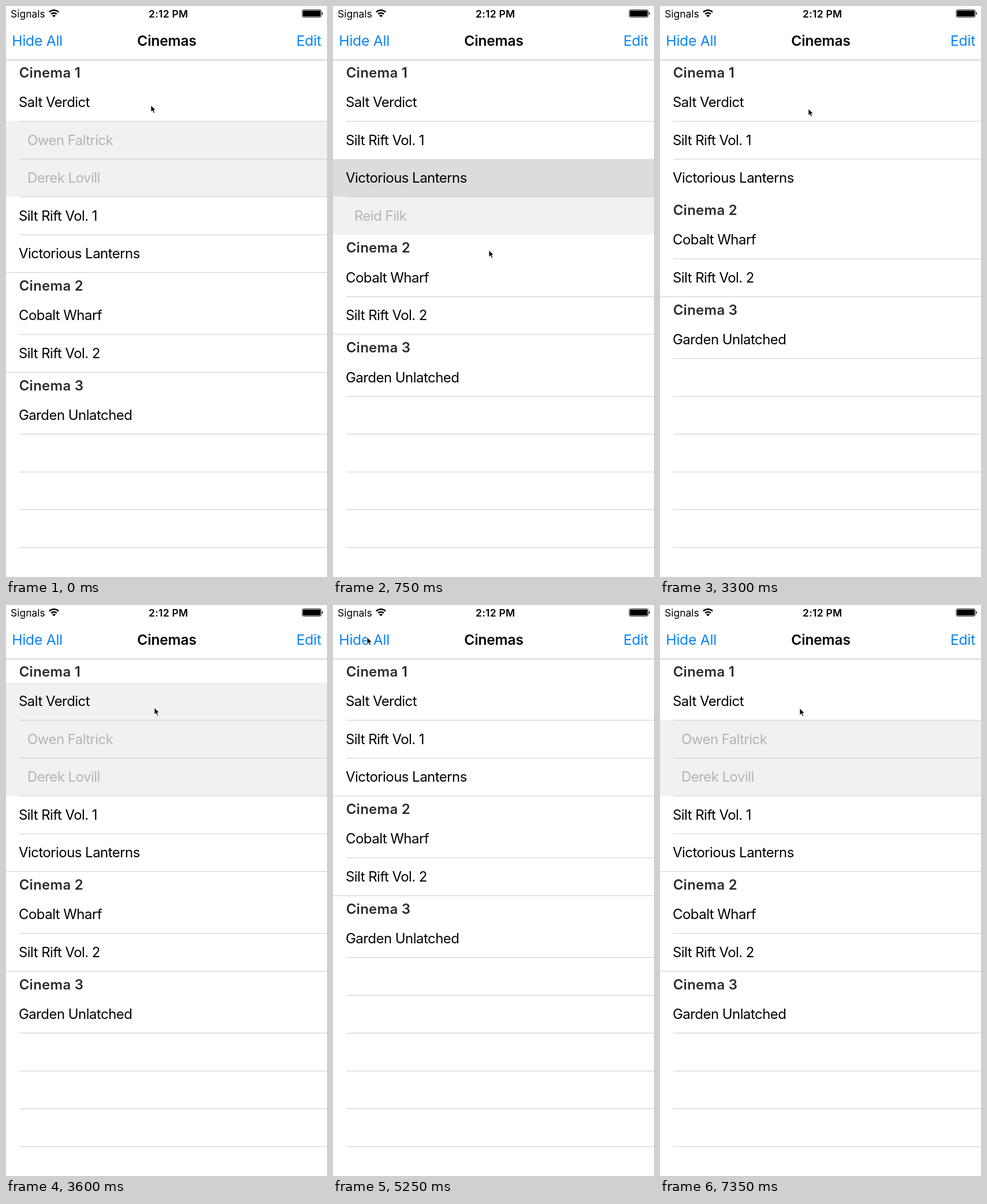
Recreate the animation shown at these times as an HTML page. Size 556 px wide and 989 px high, loop 7.5 s.

```html
<!DOCTYPE html>
<html lang="en">
<head>
<meta charset="utf-8">
<title>Cinemas</title>
<style>
  html, body { margin: 0; width: 100%; height: 100%; overflow: hidden; background: #fff; }
  svg { display: block; width: 100%; height: 100%; }
  text { font-family: Inter, Roboto, sans-serif; font-optical-sizing: none; white-space: pre; }
  .fill { shape-rendering: crispEdges; }
  .row, .actor { font-size: 24px; letter-spacing: -0.55px; }
  .actor { fill: #b4b4b4; }
  .head { font-size: 24px; font-weight: 600; letter-spacing: 0.25px; fill: #2b2b2b; }
  .title { font-size: 24.5px; font-weight: 600; letter-spacing: -0.15px; text-anchor: middle; }
  .link { font-size: 24.7px; letter-spacing: -0.25px; fill: #0a84f5; }
  .status { font-size: 17.5px; }
  .clock { font-size: 17.5px; font-weight: 600; letter-spacing: 0.25px; text-anchor: middle; }
</style>
</head>
<body>
<svg viewBox="0 0 556 989" xmlns="http://www.w3.org/2000/svg">
  <g id="list"></g>
  <g id="bar">
    <rect class="fill" width="556" height="93" fill="#fff"/>
    <rect class="fill" y="93" width="556" height="1" fill="#b4b4b6"/>
    <text class="status" x="8" y="19.5">Signals</text>
    <g fill="none" stroke="#000" stroke-width="2.5">
      <path d="M75 10.6A11.5 11.5 0 0 1 91 10.6"/>
      <path d="M78.2 14A7 7 0 0 1 87.8 14"/>
    </g>
    <path d="M83 19.4L80 16.4A4.2 4.2 0 0 1 86 16.4Z"/>
    <text class="clock" x="281.2" y="19.5">2:12 PM</text>
    <rect x="513" y="6.5" width="33" height="13" rx="2.5" fill="none" stroke="#000" stroke-width="0.8"/>
    <rect x="514.2" y="7.7" width="30.6" height="10.6" rx="1.2"/>
    <path d="M547.2 10.8q1.8 0.6 1.8 2.2t-1.8 2.2Z"/>
    <text class="link" id="hide" x="10.3" y="69.3">Hide All</text>
    <text class="title" x="278.5" y="69.3">Cinemas</text>
    <text class="link" x="546" y="69.3" text-anchor="end">Edit</text>
  </g>
  <path id="cursor" d="M0 0V11.5L2.7 9.2L4.7 13.6L6.7 12.7L4.8 8.4L8.2 8.1Z" stroke="#fff" stroke-width="0.8"/>
</svg>
<script>
const LOOP = 7500, STEP = 150, SLIDE = 300;
const ROW = 65.5, HEAD = 41.7, TOP = 92.1, GRID_END = 937.7;
const $ = id => document.getElementById(id);

// Moments at which the layout starts to change
const SWAP = 450, CLOSE = 1752, OPEN = 3300, HIDE = 4650, REOPEN = 6450;

// Pointer moves: start, end, x, y
const moves = [
  [150, 450, 270, 423],
  [900, 1350, 269, 294],
  [2550, 3150, 257, 178],
  [3600, 4300, 59, 56],
  [5850, 6300, 242, 179]
];

const clamp = u => Math.min(1, Math.max(0, u));
function ease(t, start, end = start + SLIDE) {
  const u = clamp((t - start) / (end - start));
  return u * u * (3 - 2 * u);
}

// Full strength from the tap, then a quick fade
const flash = (t, tap, hold) => t < tap ? 0 : clamp(1 - (t - tap - hold) / 250);

function pointerAt(t) {
  let x = 251, y = 172;
  for (const [start, end, tx, ty] of moves) {
    const u = ease(t, start, end);
    x += (tx - x) * u;
    y += (ty - y) * u;
  }
  return `translate(${x.toFixed(1)} ${y.toFixed(1)})`;
}

const box = (y, h, fill) =>
  `<rect class="fill" y="${y}" width="556" height="${h}" fill="${fill}"/>`;
const label = (cls, x, y, s) => `<text class="${cls}" x="${x}" y="${y}">${s}</text>`;
const line = (y, x = 23) =>
  `<rect x="${x}" y="${y}" width="${556 - x}" height="0.8" fill="#bebec0"/>`;

function shade(glow) {
  const v = Math.round(255 - 35 * glow);
  return `rgb(${v},${v},${v})`;
}

function listMarkup(t) {
  const first = 1 - ease(t, SWAP) + ease(t, OPEN) - ease(t, HIDE) + ease(t, REOPEN);
  const third = ease(t, SWAP) - ease(t, CLOSE);
  // The first row stays lightly tinted until everything is hidden
  const tinted = t <= HIDE ? flash(Math.min(t, OPEN + SLIDE), OPEN + 50, 100) : 0;
  const firstGlow = tinted + flash(t, REOPEN, 150);
  const thirdGlow = t < CLOSE ? flash(t, SWAP, 300) : flash(t, CLOSE, 350);
  const picked = t < CLOSE && thirdGlow > 0;
  const parts = [];
  let y = TOP;

  const head = s => {
    parts.push(box(y, HEAD, '#fff') + label('head', 22.7, y + 31.6, s));
    y += HEAD;
  };
  const row = (s, { glow = 0, x = 23, rule = true } = {}) => {
    const end = y + ROW;
    parts.push(box(y, ROW, shade(glow)) + label('row', 22, y + 41.3, s) + (rule ? line(end, x) : ''));
    y = end;
  };
  // Child rows slide out from under their parent
  const actors = (names, open, x, rule = true) => {
    const size = names.length * ROW, top = y + size * (open - 1);
    y += size * open;
    if (open < 0.001) return;
    let out = box(top, size, '#f1f1f1');
    names.forEach((s, i) => {
      const at = top + i * ROW;
      out += label('actor', 37, at + 41.3, s);
      if (rule || i < names.length - 1) out += line(at + ROW, x);
    });
    parts.push(out);
  };

  head('Cinema 1');
  row('Salt Verdict', { glow: firstGlow });
  actors(['Owen Faltrick', 'Derek Lovill'], first, 23);
  row('Silt Rift Vol. 1', { rule: !picked });
  row('Victorious Lanterns', {
    glow: thirdGlow,
    x: third > 0.001 ? 23 : 0,
    rule: t < CLOSE || t > OPEN
  });
  actors(['Reid Filk'], third, 0, !picked);
  head('Cinema 2');
  row('Cobalt Wharf');
  row('Silt Rift Vol. 2', { x: 0 });
  head('Cinema 3');
  row('Garden Unlatched');

  let grid = '';
  for (let g = GRID_END; g > y + 1; g -= ROW) grid += line(g);
  return grid + parts.reverse().join('');
}

function draw(t) {
  $('list').innerHTML = listMarkup(t);
  $('hide').setAttribute('opacity', 1 - 0.7 * flash(t, HIDE, 0));
  $('cursor').setAttribute('transform', pointerAt(t));
}

let shown = -1;
const begin = performance.now();
function tick() {
  const t = Math.floor((performance.now() - begin) % LOOP / STEP) * STEP;
  if (t !== shown) draw(shown = t);
  requestAnimationFrame(tick);
}
tick();
</script>
</body>
</html>
```
